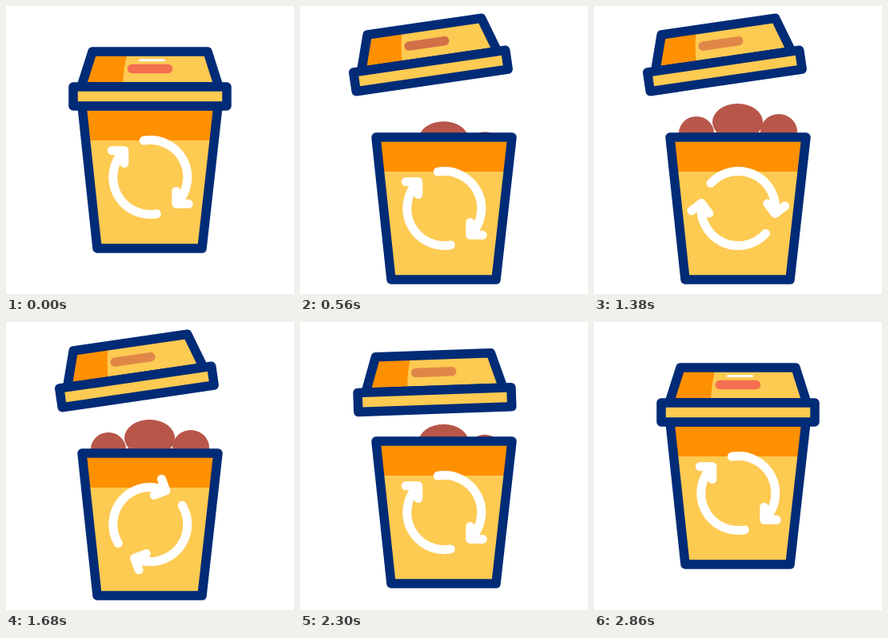
These frames come from a looping animation (360 by 360 pixels, 3600 ms). An HTML page:

```html
<!DOCTYPE html>
<html lang="en">
<head>
<meta charset="utf-8">
<title>Recycling bin</title>
<style>
  html, body { margin: 0; width: 100%; height: 100%; overflow: hidden; background: #fff; }
  svg { display: block; width: 100vw; height: 100vh; }
  .line { fill: none; stroke: #002b76; stroke-width: 11.5; stroke-linejoin: round; stroke-linecap: round; }
  .arrow { fill: none; stroke: #fff; stroke-width: 11; stroke-linejoin: round; stroke-linecap: round; }
</style>
</head>
<body>
<svg viewBox="0 0 360 360">
  <defs>
    <clipPath id="body"><path d="M95 125H265L245 303H114Z"/></clipPath>
    <clipPath id="cap"><path d="M108 57H252L266 101H94Z"/></clipPath>
    <g id="half">
      <path d="M-8-45.8A46.5 46.5 0 0 1 32.9 32.9"/>
      <path d="M32.5 17.5V33.3H48"/>
    </g>
  </defs>

  <g id="heap" fill="#b8564a">
    <ellipse cx="179.5" cy="106" rx="31.5" ry="23"/>
    <ellipse cx="128" cy="120" rx="22" ry="21"/>
    <ellipse cx="231" cy="118" rx="23" ry="22"/>
    <path d="M107 119H254V150H107Z"/>
  </g>

  <g id="bin">
    <g clip-path="url(#body)">
      <path fill="#fdca52" d="M90 120H270V308H90Z"/>
      <path fill="#ff9000" d="M90 120H270V168H90Z"/>
    </g>
    <path class="line" d="M95 125H265L245 303H114Z"/>
    <g id="arrows" class="arrow">
      <use href="#half"/>
      <use href="#half" transform="rotate(180)"/>
    </g>
  </g>

  <g id="lid">
    <g clip-path="url(#cap)">
      <path fill="#fdca52" d="M90 50H270V105H90Z"/>
      <path fill="#ff9000" d="M90 50H155Q146 72 146 105H90Z"/>
    </g>
    <path id="slot" d="M157.5 78.5H202.5" stroke-width="11.5" stroke-linecap="round"/>
    <path class="line" d="M108 57H252L266 101H94Z"/>
    <path class="line" style="fill:#fdca52" d="M84 101H276V125H84Z"/>
  </g>

  <rect id="glint" fill="#fff"/>
  <g id="puff" stroke="#002b76" stroke-width="3" stroke-linecap="round"></g>
</svg>
<script>
const LOOP = 3600;
const $ = id => document.getElementById(id);
const clamp = x => Math.max(0, Math.min(1, x));
const mix = (a, b, u) => a + (b - a) * u;
const ramp = (t, from, to) => {
  const u = clamp((t - from) / (to - from));
  return u * u * (3 - 2 * u);
};
// rises over [a, b], falls back over [c, d]
const swing = (t, a, b, c, d) => ramp(t, a, b) - ramp(t, c, d);

function slotColor(t) {
  if (t < 550) return '#f56f50';
  if (t < 1090) return '#d27048';
  return t < 2710 ? '#e08748' : '#f96c56';
}

function drawGlint(t) {
  const u = t > 2700 ? 0 : clamp(t / 220);
  const w = mix(33, 24, u), h = mix(3, 5.5, u);
  const set = (k, v) => $('glint').setAttribute(k, v);
  set('x', mix(182.5, 171, u) - w / 2);
  set('y', mix(67.5, 100.5, u) - h / 2);
  set('width', w);
  set('height', h);
  set('rx', h / 2);
  set('visibility', t < 260 || t > 2700 ? 'visible' : 'hidden');
}

// short marks thrown out on both sides as the lid lands
function drawPuff(t) {
  const u = (t - 2560) / 280;
  let marks = '';
  if (u > 0 && u < 1) {
    const far = mix(108, 124, Math.sqrt(u));
    const near = mix(106, 123, u);
    for (const side of [-1, 1])
      for (const tilt of [-0.3, 0.3]) {
        const at = r => [179 + side * r, 113 + tilt * (r - 92)];
        const [x1, y1] = at(near), [x2, y2] = at(far);
        marks += `M${x1} ${y1}L${x2} ${y2}`;
      }
  }
  $('puff').innerHTML = marks && `<path d="${marks}"/>`;
}

function draw(t) {
  const drop = 39 * swing(t, 0, 500, 2120, 2550);
  const lift = -32 * swing(t, 0, 500, 2100, 2500);
  const shift = -16.5 * swing(t, 0, 420, 2120, 2620);
  const tilt = -8.3 * swing(t, 220, 540, 2090, 2400);
  const sink = 48 * (1 - swing(t, 330, 770, 2110, 2530));
  const turn = 360 * ramp(t, 741, 2230);
  const move = (id, v) => $(id).setAttribute('transform', v);

  move('bin', `translate(0 ${drop})`);
  move('heap', `translate(0 ${drop + sink})`);
  move('arrows', `translate(180.3 214) rotate(${turn})`);
  move('lid', `translate(${shift} ${lift}) rotate(${tilt} 180 113)`);
  $('slot').setAttribute('stroke', slotColor(t));
  drawGlint(t);
  drawPuff(t);
}

const start = performance.now();
function tick() {
  const t = (performance.now() - start) % LOOP;
  draw(t < 2860 ? t : 0);
  requestAnimationFrame(tick);
}
draw(0);
requestAnimationFrame(tick);
</script>
</body>
</html>
```
